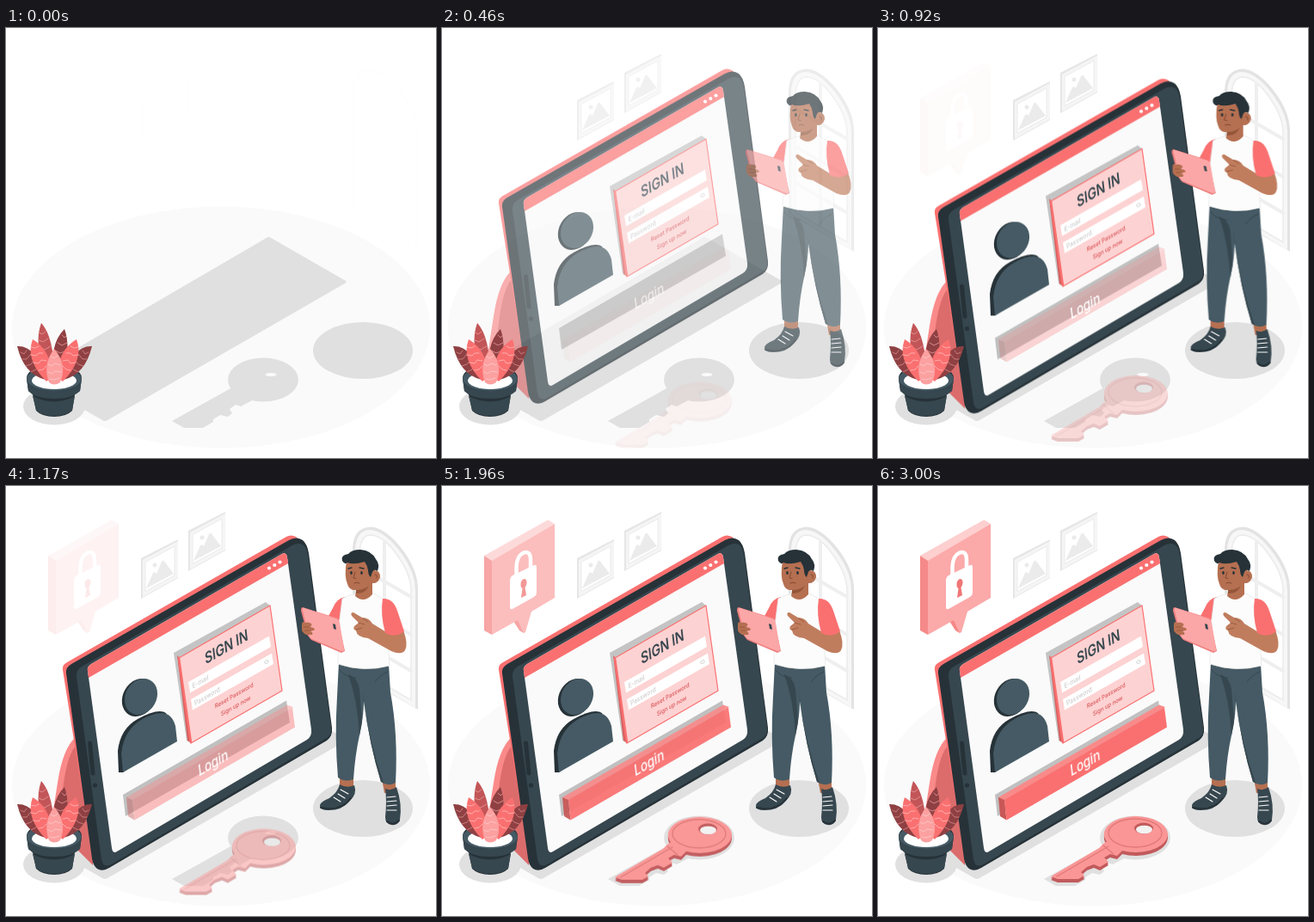
These frames come from a looping animation (500 px wide and 500 px high, 3.04 s). An HTML page:

```html
<!DOCTYPE html>
<html lang="en">
<head>
<meta charset="utf-8">
<title>Sign in</title>
<style>
html, body { margin: 0; width: 100%; height: 100%; overflow: hidden; background: #fff; }
svg { display: block; width: 100%; height: 100%; }
text { font-family: Inter, Roboto, sans-serif; }

.backdrop, .device, .person, .button, .key, .bubble {
  animation: 3040ms linear infinite both;
}
.backdrop { animation-name: backdrop; }
.device { animation-name: drop; }
.person { animation-name: enter; }
.button { animation-name: press; }
.key { animation-name: rise; }
.bubble { animation-name: bubble; }

@keyframes backdrop {
  0% { opacity: .04; }
  23%, 100% { opacity: 1; }
}
@keyframes drop {
  0% { opacity: 0; transform: translateY(-30px); animation-timing-function: cubic-bezier(.36, -.01, .5, 1.38); }
  32.895%, 100% { opacity: 1; transform: none; }
}
@keyframes enter {
  0% { opacity: 0; transform: translateX(30px); animation-timing-function: cubic-bezier(.36, -.01, .5, 1.38); }
  32.895%, 100% { opacity: 1; transform: none; }
}
@keyframes rise {
  0% { opacity: 0; transform: translateY(30px); animation-timing-function: cubic-bezier(.36, -.01, .5, 1.38); }
  98.684%, 100% { opacity: 1; transform: none; }
}
@keyframes press {
  0%, 6.6% { opacity: 0; animation-timing-function: cubic-bezier(.333, 0, .667, 1); }
  76%, 100% { opacity: 1; }
}
@keyframes bubble {
  0%, 20% { opacity: 0; animation-timing-function: cubic-bezier(.45, 0, .6, 1); }
  86%, 100% { opacity: 1; }
}

.coral { fill: #fa7070; }
.slate { fill: #455a64; }
.dark { fill: #37474f; }
.ink { fill: #263238; }
.skin { fill: #b56f51; }
.shade { fill: #e0e0e0; }
.line { fill: none; stroke-linecap: round; stroke-linejoin: round; }
</style>
</head>
<body>
<svg viewBox="0 0 500 500">
  <defs>
    <g id="picture">
      <path fill="#e6e6e6" d="M157 84 200 62V107L157 131Z"/>
      <path fill="#f5f5f5" d="M159 86 200 64V106L159 129Z"/>
      <path fill="#fff" stroke="#ebebeb" d="M162 88.500 196 70V104L162 122.500Z"/>
      <path fill="#ebebeb" d="M163 119 171 101Q173 99 175 102L181 88Q183 85 185 89L195 102 163 119Z"/>
      <circle cx="173" cy="92" r="2.500" fill="#ebebeb"/>
    </g>
    <path id="blade" d="M201 454 257 421 262 416 266 413.500A37 21 0 1 1 284 424L278 430 270 428 263 432 268 437 258 443 251 440 243 443 236 449 240 453 233 457 209 457Z"/>
    <g id="outerLeaf">
      <path d="M13 370Q36 369 46 409 21 403 13 370Z" fill="#8f4042"/>
      <path class="line" stroke="#d98c8c" stroke-width=".8" d="M17 377l4 2 3-4M19 385l5 0 5-6M23 393l6-2 6-7M29 400l6-3 4-6"/>
    </g>
    <g id="innerLeaf">
      <path class="coral" d="M31 362Q22 386 47 411L54 405Q52 374 31 362Z"/>
      <path class="line" stroke="#fbb" stroke-width=".8" d="M29 371l5 1 4-2M29 380l6 1 3-3 5 0M32 389l6 1 3-4 6 1M38 398l5-1 4-4"/>
    </g>
  </defs>

  <ellipse cx="250" cy="348" rx="243" ry="140.500" fill="#fafafa"/>

  <g class="shade">
    <path d="M303 244Q305 242 308 244L395 294Q397 295 394 297L118 456Q115 458 112 456L25 406Z"/>
    <ellipse cx="415" cy="375" rx="58" ry="33"/>
    <ellipse cx="56" cy="440" rx="36" ry="21.500"/>
    <ellipse cx="299" cy="409" rx="41" ry="25.500"/>
    <path d="M263 418 193 457 207 465H229L241 458 241 455 249 450 258 452 263 448 260 443 267 438 273 440 288 432Z"/>
  </g>
  <ellipse cx="308" cy="403" rx="6.500" ry="2" fill="#fafafa"/>

  <g class="backdrop">
    <use href="#picture"/>
    <use href="#picture" x="55" y="-32"/>
    <path fill="#e3e3e3" d="M403 216V72Q404 48 425 47.500 444 50 464 78 479 100 479 120V260Z"/>
    <path fill="#f7f7f7" d="M406 216V74Q407 51 424 51 442 53 461 80 476 101 476 121V258Z"/>
    <path fill="#fff" stroke="#ebebeb" stroke-width="1.500" d="M411 214V78Q412 57 424 57 440 58 456 82 471 103 471 122V249Z"/>
    <path class="line" stroke="#efefef" stroke-width="4" d="M440 65V232M411 94 471 129M411 138 471 173M411 180 471 215"/>
  </g>

  <g class="device">
    <path fill="#fa8a8a" d="M81 292Q66 305 60 345L52 396 100 434 104 428Z"/>
    <path fill="#dc6c6c" d="M81 302Q72 312 67 345L60 400 101 441 101 430Z"/>
    <path class="coral" d="M66 214Q65 208 71 205L326 59Q331 56 337 59L345 66 112 440 102 440Z"/>
    <path class="ink" d="M70 218Q69 211 76 207L329 63Q338 58 345 63 350 67 352 78L379 281Q380 291 373 296L120 444Q112 449 106 445 101 441 100 433Z"/>
    <path class="dark" d="M82 222Q81 214 88 210L333 69Q348 62 351 80L378 281Q379 289 373 293L124 439Q113 446 111 434Z"/>
    <path class="line" stroke="#263238" stroke-width="5" d="M97.500 299 101 334"/>
    <circle cx="103.500" cy="348" r="2.600" class="ink"/>

    <path fill="#fafafa" d="M95 215Q94 210 99 207L320 79.500Q326 76 327 83L355 283Q356 291 350 295L129 425Q124 428 123 421Z"/>
    <path class="coral" d="M95 215Q94 210 99 207L320 79.500Q326 76 327 83L328 90 96 223Z"/>
    <g fill="#fff">
      <circle cx="306" cy="95.500" r="2.100"/><circle cx="312.300" cy="92" r="2.100"/><circle cx="318.500" cy="88.500" r="2.100"/>
    </g>

    <g class="ink">
      <ellipse cx="154.500" cy="246" rx="18.500" ry="23" transform="rotate(30 154.500 246)"/>
      <path d="M131 333 130 308Q133 282 153 271 177 258 186 264L196 291 136 333Z"/>
    </g>
    <g class="slate">
      <ellipse cx="157" cy="245" rx="18" ry="22" transform="rotate(30 157 245)"/>
      <path d="M136 333 134 311Q137 284 157 272 190 253 197 279L199 297Z"/>
    </g>

    <path fill="#c4c4c4" d="M195 194 302 135 307 139 215 299 210 296Z"/>
    <path fill="#d85f5f" d="M199 197 202 200 216 299 211 296Z"/>
    <path fill="#fdd2d2" stroke="#fa7070" stroke-width="1.200" stroke-linejoin="round" d="M201 200 307 139 321 238 215 299Z"/>
    <path class="line" stroke="#fa7070" stroke-width="2.500" d="M201 200 215 298"/>
    <path fill="#fff" d="M212 228 306 174.500 308 187 214 240.500ZM215 248 309 194.500 311 207 217 260.500Z"/>
    <text transform="matrix(.84 -.485 .13 1.12 257 193)" text-anchor="middle" font-size="16" font-weight="600" class="dark">SIGN IN</text>
    <g font-size="7.300" fill="#c4c4c4">
      <text transform="matrix(.87 -.5 .14 1.05 217 235.500)">E-mail</text>
      <text transform="matrix(.87 -.5 .14 1.05 219.500 255.500)">Password</text>
    </g>
    <ellipse cx="303" cy="204.500" rx="2.500" ry="1.600" fill="none" stroke="#ccc" stroke-width=".8" transform="rotate(-30 303 204.500)"/>
    <g font-size="6.700" font-weight="500" text-anchor="middle" fill="#d9575b">
      <text transform="matrix(.87 -.5 .14 1.05 265.500 246)">Reset Password</text>
      <text transform="matrix(.87 -.5 .14 1.05 267.500 258)">Sign up now</text>
    </g>
    <path fill="#c0c0c0" d="M136 359 326 249.500 330 275 139 384Z"/>
  </g>

  <g class="button">
    <path fill="#f98a8a" d="M140 362 327 254.500 334 257 147 366Z"/>
    <path fill="#c85757" d="M140 362 147 365 149.500 388.500 142 384Z"/>
    <path class="coral" d="M147 365 333 257.500 336 280.500 149.500 388.500Z"/>
  </g>
  <g class="device">
    <text transform="matrix(.85 -.49 .13 1.1 241.500 327.500)" text-anchor="middle" font-size="15.300" font-weight="500" fill="#fff">Login</text>
  </g>

  <g class="key">
    <use href="#blade" y="4" fill="#c25a5c"/>
    <use href="#blade" y="2" fill="#c25a5c"/>
    <use href="#blade" fill="#fa9696"/>
    <ellipse cx="299" cy="403.500" rx="31" ry="16.500" fill="none" stroke="#e27878" stroke-width="1.300"/>
    <path class="line" stroke="#e27878" stroke-width="1.300" d="M208 454 268 419M262 418 274 428"/>
    <ellipse cx="309" cy="398" rx="11" ry="6.500" fill="#c25a5c"/>
    <ellipse cx="309.500" cy="399.500" rx="9.500" ry="4.800" fill="#f2f2f2"/>
  </g>

  <g class="bubble">
    <path fill="#fdcfcf" d="M49 81 122 40Q124 39 126 41L131 44 58 88Z"/>
    <path fill="#f58989" d="M49 81 58 87V173L49 168ZM83 157 90 168 95 171 97 150Z"/>
    <path fill="#fca9a9" d="M58 87 131 44V130L104 146 97 170Q95 172 94 169L88 156 58 173Z"/>
    <path class="line" stroke="#fff" stroke-width="4.500" d="M86.500 105V94Q87 81 95 77.500 103 75 103 86V97"/>
    <path fill="#fff" d="M79 109Q79 106 82 104L107 92Q110 91 110 94V124Q110 127 107 129L82 143Q79 144 79 141Z"/>
    <path fill="#f07676" d="M91.500 116Q91 110 95 108 99 108 98.500 113 98 116 96.500 118L98 127 92 130 93.500 119Q92 119 91.500 116Z"/>
  </g>

  <g class="person">
    <path class="skin" d="M388 334H404V351L388 352ZM437 340H453V356L440 357Z"/>
    <path class="dark" d="M388 347Q396 352 405 348 409 358 399 367 391 377 375 377 364 377 365 371 366 367 376 363 386 356 388 347ZM441 352Q448 355 454 350 461 370 458 388 456 395 448 394 441 393 441 385 443 366 441 352Z"/>
    <path class="line" stroke="#263238" stroke-width="2" d="M366 374Q389 379 401 363M443 390Q450 396 457 389"/>
    <path class="line" stroke="#fff" stroke-width="1.100" d="M389 353l9 5M386 358l8 5M381 362l8 5M443 362l10-1M443 367l11-1M443 372l11-1M443 377l11 0"/>
    <path class="slate" d="M387 205 385 245Q382 292 386 339 394 345 404 341 406 312 411 290 416 268 416 250 423 302 436 344 444 350 453 345 456 288 447 240L445 207Z"/>
    <path class="dark" d="M398 219Q409 223 411 236L414 274 411 290Q409 250 398 219ZM415 236 417 256Q424 302 439 345L436 344Q423 302 416 250Z"/>
    <path class="line" stroke="#37474f" stroke-width="1" d="M388 214Q395 223 407 223M444 216Q434 220 429 228"/>

    <path class="coral" d="M394 129Q384 131 380 142L374 153 388 164Q394 149 394 129Z"/>
    <path fill="#fcfcfc" stroke="#e8e8e8" stroke-width=".8" d="M391 131Q400 126 408 125L426 124 438 131Q446 145 444 175L446 209Q416 217 386 207L387 162Z"/>
    <path class="skin" d="M408 116 426 108V126Q416 137 406 128Z"/>
    <path fill="#945539" d="M407 119Q416 120 423 113 419 126 407 125Z"/>
    <path class="skin" d="M396 87Q393 105 397 114 399 122 408 121 418 121 425 113 433 114 435 106 435 98 428 98L421 85Z"/>
    <path class="ink" d="M391 87Q389 80 398 79 402 74 412 74 425 75 430 85 435 91 432 99 428 96 426 100L424 106Q421 103 421 98 420 92 417 88 404 92 397 89 394 92 391 87Z"/>
    <g class="ink"><ellipse cx="401.500" cy="101" rx="1.300" ry="2"/><ellipse cx="413.500" cy="101" rx="1.300" ry="2"/></g>
    <path class="line" stroke="#263238" stroke-width="1.300" d="M398 96l4-1M411 95l5 1"/>
    <path class="line" stroke="#824a33" stroke-width="1" d="M406 100 404 107 407 107.500M405 113Q408 111 411 113M429 103Q432 102 431 107"/>

    <path class="skin" d="M344 161Q344 157 350 158L358 158 360 170 354 174Q346 173 344 168Z"/>
    <path fill="#f07f7f" d="M345 141 386 154 394 192 390 194 355 179 351 174 343 145Q343 141 345 141Z"/>
    <path fill="#fca7a7" d="M347 142 384 154Q387 155 388 159L393 190Q393 193 390 192L356 178Q353 177 352 173L345 145Q344 141 347 142Z"/>
    <path class="dark" d="M380 160 383 161 384 167 381 166Z"/>
    <path class="skin" d="M344 160Q351 157 355 160 357 163 351 164 359 164 359 167 358 169 352 168 358 170 356 173L349 173Q343 169 344 160Z"/>
    <path class="line" stroke="#945539" stroke-width=".8" d="M347 164H354M348 168H355"/>

    <path fill="#c07d5e" d="M462 168Q468 183 464 191 460 197 448 192L421 177Q408 176 407 168 403 167 405 163L410 159 402 151Q400 147 404 147L414 153Q422 153 426 160L444 171Z"/>
    <path class="line" stroke="#945539" stroke-width=".8" d="M410 159 417 161M407 167 414 165M415 154 421 158"/>
    <path class="coral" d="M438 131Q450 130 455 145L463 169Q453 177 441 171 435 149 438 131Z"/>
  </g>

  <g class="plant">
    <path class="ink" d="M24 407Q24 394 56 394 88 394 88 407L86 422 80 426 77 445Q70 452 56 452 42 452 35 445L31 426 26 422Z"/>
    <path class="dark" d="M31 428Q56 441 80 428L77 444Q70 451 56 451 42 451 35 444Z"/>
    <ellipse cx="56" cy="408" rx="32" ry="14" class="slate"/>
    <path class="dark" d="M24 408Q28 422 56 422 84 422 88 408L86 422Q77 431 56 431 35 431 26 422Z"/>
    <ellipse cx="56" cy="410" rx="26" ry="10" fill="#fff"/>
    <use href="#outerLeaf"/>
    <use href="#outerLeaf" transform="matrix(-1 0 0 1 113 0)"/>
    <path fill="#8f4042" d="M68 350Q49 369 57 406H66Q76 371 68 350Z"/>
    <path fill="#c25557" d="M41 343Q32 367 46 406H56Q56 359 41 343Z"/>
    <path class="line" stroke="#e79c9c" stroke-width=".8" d="M38 354l4 2 4-3M38 363l5 2 6-4M40 372l5 2 7-4M65 357l3 3 2-2M60 366l5 3 6-3M57 375l6 3 8-3"/>
    <use href="#innerLeaf"/>
    <use href="#innerLeaf" transform="matrix(-1 0 0 1 113 0)"/>
    <path fill="#fca0a0" d="M56 373Q42 392 50 412 56 417 63 412 72 392 56 373Z"/>
    <path class="line" stroke="#fdcccc" stroke-width=".8" d="M52 382l4 2 4-3M49 391l4 2 4-3 6 2M49 400l4 2 4-3 7 1M51 408l5 1 6-2"/>
  </g>
</svg>
</body>
</html>
```
